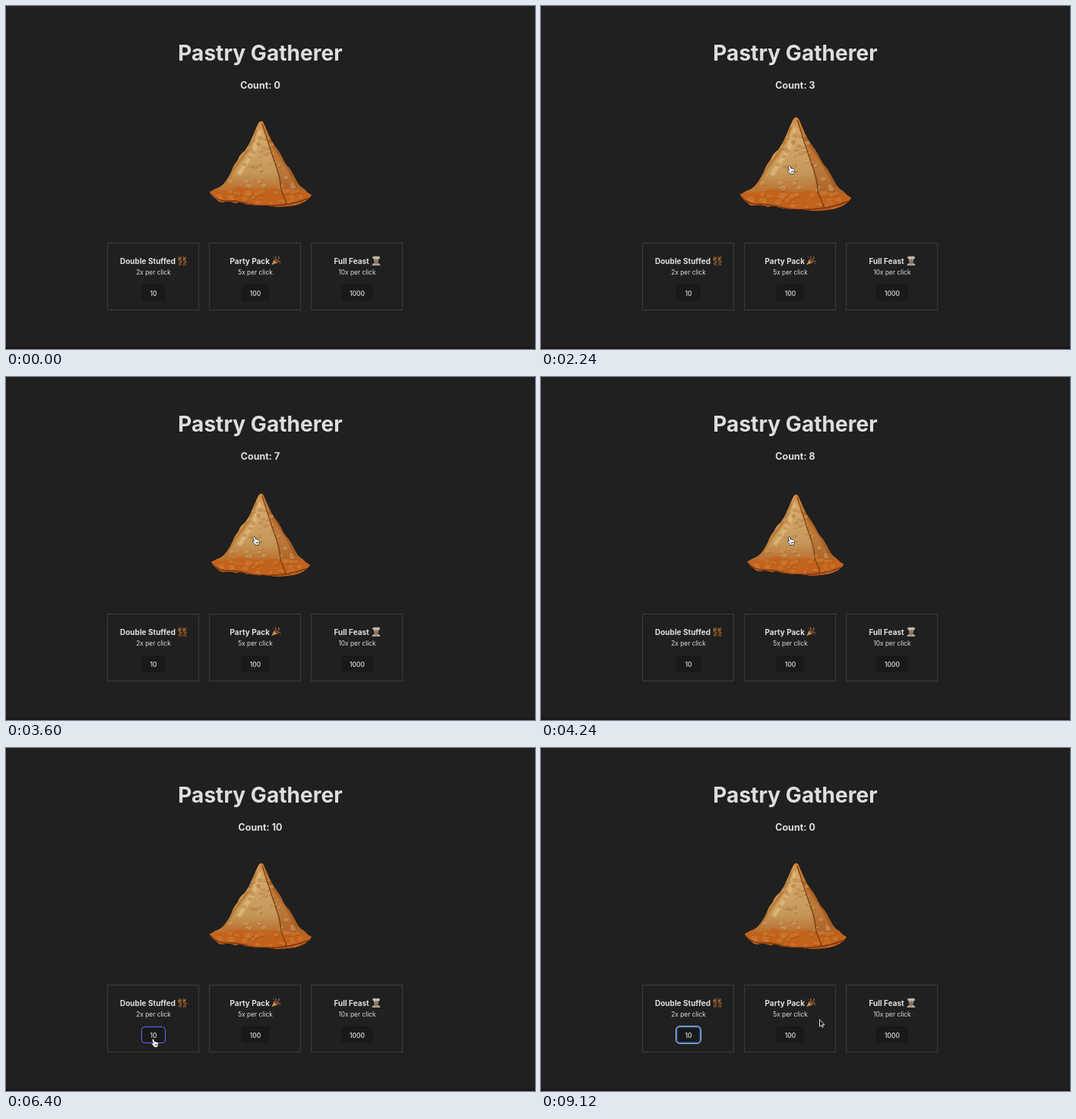
Animation, 696 px wide and 452 px high, one loop 9200 ms. Source, as an HTML page:

```html
<!DOCTYPE html>
<html lang="en">
<head>
<meta charset="utf-8">
<title>Pastry Gatherer</title>
<style>
  html, body { margin: 0; width: 100%; height: 100%; overflow: hidden; background: #202020; }
  svg { display: block; width: 696px; height: 452px; }
  text { font-family: Inter, Roboto, sans-serif; fill: #dedede; text-anchor: middle; }
  .title { font-size: 28.1px; font-weight: 700; }
  .count { font-size: 12.5px; font-weight: 650; }
  .name { font-size: 10px; font-weight: 650; text-anchor: start; }
  .rate { font-size: 8.35px; }
  .price { font-size: 8.6px; font-weight: 500; }
</style>
</head>
<body>
<svg viewBox="0 0 696 452">
  <defs>
    <linearGradient id="crust" x1="0" y1="0" x2="0" y2="1">
      <stop offset="0" stop-color="#d08a48"/>
      <stop offset=".2" stop-color="#d3a868"/>
      <stop offset=".6" stop-color="#c39858"/>
      <stop offset=".78" stop-color="#bd7434"/>
      <stop offset="1" stop-color="#b4541a"/>
    </linearGradient>
    <linearGradient id="side" x1="0" y1="0" x2="0" y2="1">
      <stop offset="0" stop-color="#cb6f20"/>
      <stop offset=".55" stop-color="#b9793a"/>
      <stop offset="1" stop-color="#a84e16"/>
    </linearGradient>
    <filter id="soft" x="-20%" y="-20%" width="140%" height="140%"><feGaussianBlur stdDeviation="1.1"/></filter>
    <filter id="haze" x="-20%" y="-20%" width="140%" height="140%"><feGaussianBlur stdDeviation=".6"/></filter>
    <path id="outline" d="M335 152 C332 153 331 157 329 161 L324 173 Q320 183 314 191 Q307 196 305 203
      Q299 210 297 217 Q294 224 289 231 Q283 239 275 241 Q271 244 268 245 Q271 251 276 254
      Q281 260 288 258 Q296 257 302 260 Q309 257 315 261 L332 263 Q344 262 354 264.5
      Q373 265 386 261 Q397 257 402 249 Q396 246 392 241 Q386 238 382 230 Q378 222 373 214
      Q366 207 363 199 Q359 191 354 185 Q349 178 346 171 L340 157 Q338 151 335 152Z"/>
    <clipPath id="inside"><use href="#outline"/></clipPath>
  </defs>
  <rect width="696" height="452" fill="#202020"/>
  <rect y="449" width="696" height="3" fill="#1c171b"/>
  <text class="title" x="334.5" y="72">Pastry Gatherer</text>
  <text class="count" id="count" x="334.5" y="109.3"></text>

  <g id="pastry">
    <use href="#outline" fill="url(#crust)"/>
    <g clip-path="url(#inside)">
      <g filter="url(#soft)">
        <path d="M336 150 Q346 185 356 214 Q361 235 366 268 H410 V240 L345 150Z" fill="url(#side)"/>
        <path d="M264 240 Q288 247 306 238 Q330 245 352 240 Q376 248 406 240 V272 H264Z" fill="#c2621f"/>
        <path d="M330 163 L318 190 L300 214 L286 238" fill="none" stroke="#b9702c" stroke-width="3"/>
        <path d="M334 164 Q330 188 318 203 L306 222" fill="none" stroke="#ddb878" stroke-width="5"/>
        <path d="M347 176 Q365 200 384 236" fill="none" stroke="#a6561b" stroke-width="4"/>
      </g>
      <g id="bubbles" filter="url(#haze)"></g>
      <path d="M337 155 Q345 181 354 207 Q361 225 362 242 L370 262" fill="none" stroke="#5d2c0d" stroke-width="1.2" opacity=".8"/>
      <path d="M268 247 Q280 258 290 257 T315 260 T354 263 T399 253" fill="none" stroke="#8a3a10" stroke-width="2" filter="url(#haze)"/>
    </g>
  </g>

  <g id="cards"></g>

  <g id="hand" stroke="#111" stroke-width=".7" stroke-linejoin="round">
    <path d="M-2.8 -5.2 C-2 -6 -.9 -5.5 -.6 -4.5 L.1 -1.8 C.8 -2.5 1.7 -2.2 2 -1.5 C2.6 -2 3.3 -1.6 3.5 -.9
      C4.4 -1.2 5 -.4 5 .5 C5.1 2.2 4.8 3.4 4 4 V5.5 H-.6 C-1 4 -2.4 2.8 -3.8 1.3
      C-4.5 .2 -3.5 -.5 -2.6 .1 L-1.9 .7 L-3.2 -3.8 Q-3.4 -4.8 -2.8 -5.2Z" fill="#fff"/>
    <path d="M.5 1.5 L.9 3.6 M1.9 1.2 L2.3 3.4 M3.3 1 L3.5 3" fill="none"/>
  </g>
  <path id="arrow" d="M-2.5 -5.2 V4 L-.4 2.1 L1 5.1 L2.5 4.4 L1.2 1.6 H4Z" fill="#111" stroke="#eee" stroke-width=".9"/>
</svg>
<script>
const LOOP = 9200, STEP = 80;
const $ = id => document.getElementById(id);

// Blisters on the face, and a rougher mottled rim below it
let seed = 11;
const random = () => (seed = seed * 16807 % 2147483647) / 2147483647;
const blister = (x, y, r, light, dark) => `
  <ellipse cx="${x + .6}" cy="${y + 1}" rx="${r}" ry="${r * .8}" fill="${dark}" opacity=".4"/>
  <ellipse cx="${x}" cy="${y}" rx="${r}" ry="${r * .8}" fill="${light}" opacity=".5"/>`;
const face = Array.from({ length: 46 }, () => {
  const y = 172 + random() * 68, half = (y - 152) * .5;
  return blister(335 + (random() * 2 - 1) * half, y, 1.2 + random() * 2.6, '#dcb272', '#8a4c18');
});
const rim = Array.from({ length: 38 }, () =>
  blister(270 + random() * 130, 244 + random() * 16, 1.5 + random() * 3, '#e28c3a', '#8a3c10'));
$('bubbles').innerHTML = [...face, ...rim].join('');

const dancer = x => `<g transform="translate(${x} 0)" fill="none" stroke="#a8692c" stroke-width="1.1">
  <path d="M-1.6 330 L-.9 332.5 M1.6 330 L.9 332.5" stroke="#8a5c30"/>
  <circle cy="333" r="1.6" fill="#a8692c" stroke="none"/>
  <path d="M-1.5 334.8 H1.5 L1.1 337 L1.6 339 H-1.6 L-1.1 337Z" fill="#6d451f" stroke="none"/>
  <path d="M-1.4 335.5 L-2.4 332.5 M1.4 335.5 L2.4 338 M-.9 339 L-1.3 341.8 M.9 339 L1.4 341.8"/>
</g>`;
const icons = [
  dancer(229) + dancer(235),
  `<path d="M349.5 341 L353 333.5 L358 338Z" fill="#d8a34c"/>
   <path d="M351 337.5 L354 340 M352.4 335 L356 338.5" stroke="#9b6430"/>
   <ellipse cx="355.5" cy="335.7" rx="1.6" ry="3.1" transform="rotate(-45 355.5 335.7)" fill="#79462e"/>
   <path d="M355 333 Q356 331 354 330 M357 335 L360 331 M358 337 Q360 335 361 337" fill="none" stroke="#d4823e"/>
   <path d="M351 331h1M358 330.5h1M360 339h1" stroke="#6aa0c4"/>`,
  `<path d="M484 336 V333.5 Q481 332 482.5 330.5 Q484 329.5 487 330 Q491 329 492 331 Q492.5 333 490 333.5 V336Z" fill="#bcb6ad"/>
   <circle cx="487" cy="336.4" r="2.8" fill="#9b704f"/>
   <path d="M484 335 H490" stroke="#8a8178"/>
   <path d="M481.5 342 Q482 339 485 338.7 H489 Q492 339 492.5 342Z" fill="#aaa59d"/>
   <path d="M486 339 L487 341 L488 339" fill="#75533c"/>`
];

const cards = [
  { left: 134, nameX: 150, name: 'Double Stuffed', rate: '2x', price: 10, width: 32 },
  { left: 268, nameX: 294.5, name: 'Party Pack', rate: '5x', price: 100, width: 37 },
  { left: 402, nameX: 431.5, name: 'Full Feast', rate: '10x', price: 1000, width: 42 }
];
$('cards').innerHTML = cards.map(({ left, nameX, name, rate, price, width }, i) => {
  const mid = left + 60;
  return `<rect x="${left - .3}" y="312.4" width="120" height="88.3" fill="none" stroke="#474747" stroke-width=".8"/>
    <text class="name" x="${nameX}" y="339.6">${name}</text>${icons[i]}
    <text class="rate" x="${mid}" y="354">${rate} per click</text>
    <rect x="${mid - width / 2}" y="367" width="${width}" height="22" rx="4" fill="#191919"/>
    <text class="price" x="${mid}" y="381.7">${price}</text>`;
}).join('') + `
  <rect id="border" x="178.5" y="367.5" width="31" height="21" rx="4" fill="none" stroke="#646cff"/>
  <g id="ring" fill="none">
    <rect x="177.7" y="366.7" width="32.6" height="22.6" rx="4.6" stroke="#e4ebf5" stroke-width="1"/>
    <rect x="178.8" y="367.8" width="30.4" height="20.4" rx="3.6" stroke="#2870d8" stroke-width="1.3"/>
  </g>`;

const clamp = v => Math.min(1, Math.max(0, v));
const ease = u => u * u * (3 - 2 * u);
const ramp = (t, start, length) => ease(clamp((t - start) / length));

// Cursor stops: time, x, y
const stops = [
  [80, 556, 402], [880, 328.5, 216], [4960, 328.5, 216], [5600, 195.5, 389],
  [6900, 195.5, 389], [7600, 195.5, 386], [8700, 195.5, 386], [9040, 369, 363]
];
function cursorAt(t) {
  let [, x, y] = stops[0];
  for (let i = 1; i < stops.length; i++) {
    const [t0, x0, y0] = stops[i - 1], [t1, x1, y1] = stops[i];
    const u = ramp(t, t0, t1 - t0);
    x += (x1 - x0) * u;
    y += (y1 - y0) * u;
  }
  return [x, y];
}

const CLICKS = 10, FIRST_CLICK = 1420, CLICK_GAP = 360, PRESS = 140;
const ENTER = 620, LEAVE = 5180, BUTTON_ENTER = 5480, BUTTON_LEAVE = 8780;
const FOCUS = 6480, PURCHASE = 6560;

function pastryScale(t) {
  let scale = 1 + .092 * (ramp(t, ENTER, 100) - ramp(t, LEAVE, 100));
  for (let i = 0; i < CLICKS; i++) {
    const release = FIRST_CLICK + i * CLICK_GAP;
    scale -= .147 * (ramp(t, release - PRESS, 80) - ramp(t, release, 80));
  }
  return scale;
}

function draw(t) {
  const clicks = Math.floor((t - FIRST_CLICK) / CLICK_GAP) + 1;
  const count = t >= PURCHASE ? 0 : Math.min(CLICKS, Math.max(0, clicks));
  $('count').textContent = `Count: ${count}`;
  $('pastry').setAttribute('transform',
    `translate(335 208.6) scale(${pastryScale(t)}) translate(-335 -208.6)`);
  $('border').setAttribute('opacity', ramp(t, BUTTON_ENTER, 250) - ramp(t, BUTTON_LEAVE, 250));
  $('ring').setAttribute('opacity', +(t >= FOCUS));

  const pointing = (t >= ENTER && t < LEAVE) || (t >= BUTTON_ENTER && t < BUTTON_LEAVE);
  const place = `translate(${cursorAt(t).join(' ')})`;
  $('hand').setAttribute('transform', place);
  $('arrow').setAttribute('transform', place);
  $('hand').setAttribute('opacity', +pointing);
  $('arrow').setAttribute('opacity', +(t >= STEP && !pointing));
}

const start = performance.now();
function tick() {
  const t = (performance.now() - start) % LOOP;
  draw(Math.floor(t / STEP) * STEP);
  requestAnimationFrame(tick);
}
tick();
</script>
</body>
</html>
```
